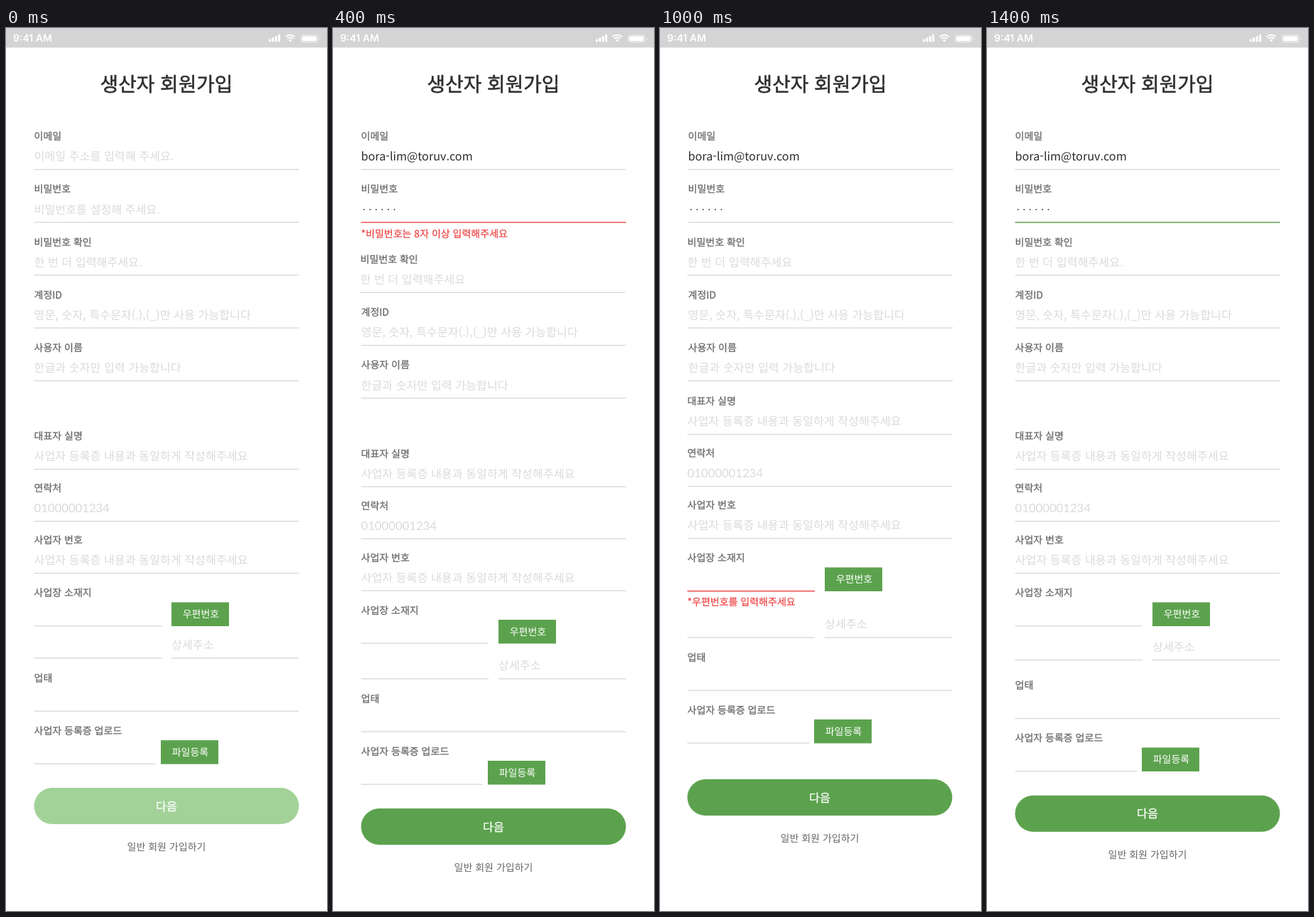
Write an HTML page that moves like this. It is 452 px wide and 1240 px high and loops after 1.6 s.

```html
<!DOCTYPE html>
<html lang="ko">
<head>
<meta charset="utf-8">
<title>생산자 회원가입</title>
<style>
html, body { margin: 0; width: 100%; height: 100%; overflow: hidden; background: #fff; }
svg { display: block; position: absolute; left: 0; top: 0; }
text { font-family: "Noto Sans CJK KR", "Noto Sans CJK", "Noto Sans CJK JP", sans-serif; font-size: 14px; fill: #666; text-rendering: geometricPrecision; }
.title { font-size: 27.8px; font-weight: 500; fill: #2e2e2e; text-anchor: middle; }
.clock { font: 600 14px Inter, Roboto, sans-serif; fill: #fff; }
.label { font-weight: 500; }
.hint { font-size: 16.2px; font-weight: 300; fill: #dadada; }
.digits { font: 400 16.7px Lato, sans-serif; fill: #dadada; }
.value { font-size: 16.2px; fill: #2e2e2e; }
.error { font-weight: 500; fill: #ee4242; }
.btn { fill: #fff; text-anchor: middle; }
.next { font-size: 16.2px; font-weight: 500; fill: #fff; text-anchor: middle; }
.link { text-anchor: middle; }
.faux .title { stroke: #2e2e2e; stroke-width: .55px; }
.faux .label { stroke: #666; stroke-width: .25px; }
.faux .error { stroke: #ee4242; stroke-width: .2px; }
.faux .next { stroke: #fff; stroke-width: .25px; }
</style>
</head>
<body>
<svg id="stage" width="452" height="1240" viewBox="0 0 452 1240">
  <rect width="452" height="27.5" fill="#d4d4d4"/>
  <text class="clock" x="10" y="19">9:41 AM</text>
  <g fill="#fff">
    <rect x="370" y="15.5" width="3" height="4" rx=".8"/>
    <rect x="374.4" y="13.5" width="3" height="6" rx=".8"/>
    <rect x="378.8" y="11.5" width="3" height="8" rx=".8"/>
    <rect x="383.2" y="9" width="3" height="10.5" rx=".8"/>
    <path d="M400.3 19.4l-2.4-2.5a3.5 3.5 0 0 1 4.8 0z"/>
    <rect x="417" y="11.5" width="20.5" height="7" rx="1"/>
    <path d="M441.6 13a2.2 2.2 0 0 1 0 4z" opacity=".6"/>
  </g>
  <g fill="none" stroke="#fff">
    <path d="M393.6 12.4a9.6 9.6 0 0 1 13.4 0M396 15a6.2 6.2 0 0 1 8.6 0" stroke-width="1.9"/>
    <rect x="415.4" y="9.9" width="23.8" height="10.2" rx="2.4" opacity=".6"/>
  </g>
  <text class="title" x="226" y="89">생산자 회원가입</text>
</svg>
<script>
const NS = 'http://www.w3.org/2000/svg';
const GREEN = '#5ca24e', PALE = '#a3d299', RED = '#ee5450', GREY = '#d8d8d8';
const LEFT = 39.5, WIDE = 373, STEP = 200;
const stage = document.getElementById('stage');

const add = (parent, tag, attrs, text) => {
  const el = document.createElementNS(NS, tag);
  for (const key in attrs) el.setAttribute(key, attrs[key]);
  if (text) el.textContent = text;
  return parent.appendChild(el);
};

// y is the vertical middle of the glyphs
const SIZE = { hint: 16.2, digits: 16.2, value: 16.2, next: 16.2 };
const write = (g, cls, x, y, text) =>
  add(g, 'text', { class: cls, x, y: y + (SIZE[cls] || 14) * .37 }, text);

const rule = (g, x, y, width, color = GREY) =>
  add(g, 'rect', { x, y: y - .7, width, height: color === GREY ? 1.3 : 1.5, fill: color });

const dots = (g, x, y, count) => {
  for (let i = 0; i < count; i++)
    add(g, 'circle', { cx: x + 4.2 + i * 8.55, cy: y, r: .95, fill: '#333' });
};

const button = (g, x, y, text) => {
  add(g, 'rect', { x, y, width: 81, height: 33.5, fill: GREEN });
  write(g, 'btn', x + 41.5, y + 16.7, text);
};

const field = (g, x, y, label, hint, color) => {
  write(g, 'label', x, y, label);
  if (hint) write(g, /^\d+$/.test(hint) ? 'digits' : 'hint', x, y + 28.5, hint);
  rule(g, x, y + 46.7, WIDE, color);
};

const LABELS = ['이메일', '비밀번호', '비밀번호 확인', '계정ID', '사용자 이름'];
const HINTS = ['이메일 주소를 입력해 주세요.', '비밀번호를 설정해 주세요.', '한 번 더 입력해주세요',
  '영문, 숫자, 특수문자(.),(_)만 사용 가능합니다', '한글과 숫자만 입력 가능합니다'];
const SAME = '사업자 등록증 내용과 동일하게 작성해주세요';

// account rows, with those from index `from` pushed down by `push`
const rows = (from = 5, push = 0) =>
  LABELS.map((_, i) => 152 + i * 74.2 + (i >= from ? push : 0));

// dx: shift per upper row; lower: shift of the business part
// owner, detail, kind, upload, next: heights of the business part
const base = { rows: rows(), dx: [0, 0, -1, 0, 0], lower: -1, typed: true, pass: 6, confirm: 0,
  gap: 73, marks: {}, next: 1096, owner: 597.5, detail: 914, kind: 941.5, upload: 1015.5 };
const states = [
  { dx: [0, 0, 0, 0, 0], lower: 0, typed: false, pass: 0, dot: true, pale: true,
    owner: 573, detail: 885, kind: 912.7, upload: 986.7, next: 1067 },
  { rows: rows(1, 23.5), dx: [0, .3, 1, 1, 1], lower: 1,
    marks: { 0: RED }, error: [40, 214, '*이미 가입된 이메일 주소입니다.'] },
  { rows: rows(2, 24.4), lower: 0,
    marks: { 1: RED }, error: [39.5, 289, '*비밀번호는 8자 이상 입력해주세요'] },
  { rows: rows(3, 24.4), pass: 8, confirm: 8,
    marks: { 2: RED }, error: [39.5, 363, '*비밀번호가 일치하지 않습니다'] },
  { rows: rows(4, 25.7), gap: 74,
    marks: { 3: RED }, error: [39.5, 443, '*이미 존재하는 계정ID 입니다'],
    owner: 555.7, detail: 873.5, kind: 901, upload: 975, next: 1055.7 },
  { marks: { zip: RED }, error: [38.5, 806, '*우편번호를 입력해주세요'],
    owner: 524, detail: 856, kind: 883.5, upload: 957.5, next: 1055 },
  { marks: { file: RED }, error: [38.5, 1015.5, '*파일을 등록해주세요'], zip: '00000', stray: 1097,
    owner: 523.2, detail: 841, kind: 874.3, upload: 950.6, next: 1055.7 },
  { dx: [0, 0, 0, 0, 0], lower: 0, dot: true, marks: { 1: GREEN },
    owner: 573, detail: 887.5, kind: 923, upload: 997, next: 1077.7 }
].map(s => ({ ...base, ...s }));

function drawAccount(g, s) {
  LABELS.forEach((label, i) => {
    const x = LEFT + s.dx[i], y = s.rows[i];
    const count = i === 1 ? s.pass : i === 2 ? s.confirm : 0;
    const email = i === 0 && s.typed;
    const hint = HINTS[i] + (i === 2 && s.dot ? '.' : '');
    field(g, x, y, label, count || email ? '' : hint, s.marks[i]);
    if (email) write(g, 'value', x, y + 28.5, 'bora-lim@toruv.com');
    dots(g, x, y + 28.7, count);
  });
}

function drawBusiness(g, s) {
  const x = LEFT + s.lower, y = s.owner, phone = y + s.gap;
  field(g, x, y, '대표자 실명', SAME);
  field(g, x, phone, '연락처', '01000001234');
  field(g, x, phone + 73, '사업자 번호', SAME);

  const place = phone + 147;
  write(g, 'label', x, place, '사업장 소재지');
  if (s.zip) write(g, 'digits', x, place + 33, s.zip);
  rule(g, x, place + 46.7, 179.5, s.marks.zip);
  button(g, x + 193.5, place + 13.5, '우편번호');
  rule(g, x, s.detail, 179.5);
  rule(g, x + 193.5, s.detail, 179.5);
  write(g, 'hint', x + 193.5, s.detail - 18.5, '상세주소');

  field(g, x, s.kind, '업태');
  write(g, 'label', x, s.upload, '사업자 등록증 업로드');
  rule(g, x, s.upload + 46.7, 171.5, s.marks.file);
  button(g, x + 178.5, s.upload + 13.5, '파일등록');

  if (s.stray) rule(g, x, s.stray, WIDE);
  add(g, 'rect', { x, y: s.next, width: WIDE, height: 51, rx: 25.5, fill: s.pale ? PALE : GREEN });
  write(g, 'next', x + WIDE / 2, s.next + 25.7, '다음');
  write(g, 'link', x + WIDE / 2, s.next + 82.8, '일반 회원 가입하기');
}

// thicken text slightly where no medium weight is installed
const pen = document.createElement('canvas').getContext('2d');
const measure = weight => {
  pen.font = weight + ' 100px "Noto Sans CJK KR", "Noto Sans CJK JP", sans-serif';
  return pen.measureText('IDaelm').width;
};
if (measure(400) === measure(500)) stage.classList.add('faux');

const total = states.length;
states.forEach((s, i) => {
  const g = add(stage, 'g', {});
  drawAccount(g, s);
  drawBusiness(g, s);
  if (s.error) write(g, 'error', ...s.error);
  const key = (offset, opacity) => ({ offset, opacity, easing: 'steps(1)' });
  const steps = [key(i / total, 1), key((i + 1) / total, 0)];
  if (i > 0) steps.unshift(key(0, 0));
  if (i < total - 1) steps.push(key(1, 0));
  g.animate(steps, { duration: total * STEP, iterations: Infinity, fill: 'backwards' });
});
</script>
</body>
</html>
```
